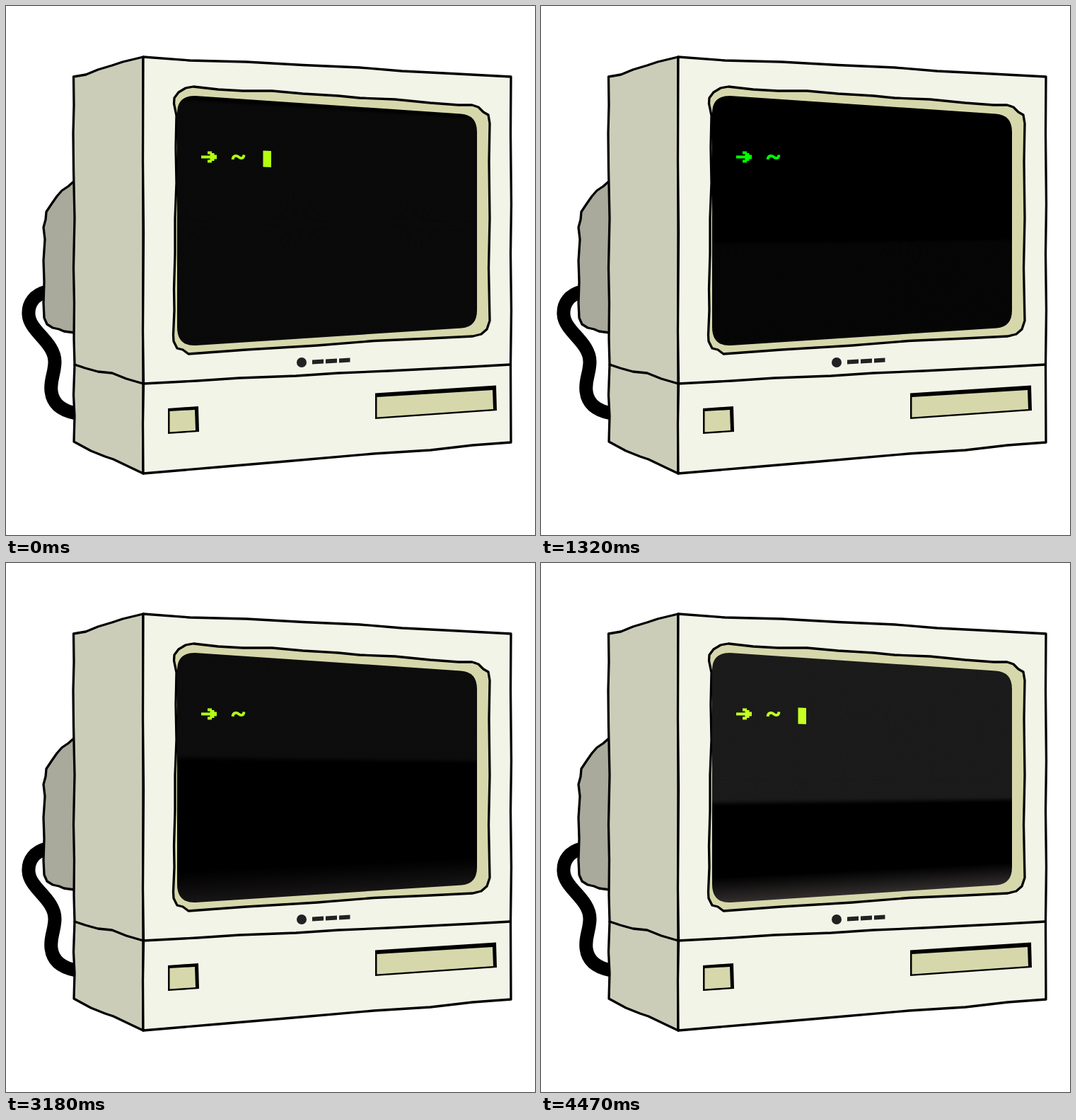
Write an HTML page with a canvas that moves like this. It is 748 px wide and 748 px high and loops after 4.5 s.

```html
<!DOCTYPE html>
<html lang="en">
<head>
<meta charset="utf-8">
<title>Terminal</title>
<style>
html, body { margin: 0; width: 100%; height: 100%; overflow: hidden; background: #fff; }
svg, canvas { position: absolute; left: 0; top: 0; width: 748px; height: 748px; display: block; }
canvas {
  clip-path: path("M242 152 Q242 127 267 127 L643 152.500 Q666 154 666 178 L666 430 Q666 454 644 455.500 L268 480 Q242 481 242 454 Z");
}
.line { fill: none; stroke: #000; stroke-width: 3.3; stroke-linejoin: round; stroke-linecap: round; }
.tan { fill: #d6d8ac; }
</style>
</head>
<body>
<svg viewBox="0 0 748 748">
  <path d="M57 404 C41 408 31 420 32 436 C33 460 69 475 69 503 C69 520 62 528 64 545 C66 562 78 572 99 576" fill="none" stroke="#000" stroke-width="19"/>
  <path class="line" style="fill:#a9aa9b" d="M97 247 L88 255 79 261 72 269 65 279 57 291 56 302 53 313 55 330 53 360 54 390 53 420 54 441 58 450 66 455 75 457 82 460 97 462"/>
  <path class="line" style="fill:#cbcdb9" d="M95.500 100 L113 97 130 90 150 84 165 79 194 72 V661 L175 652 152 641 140 637 120 629 96 616 97 580 95.500 550 97 507 96 470 96.500 420 95.500 370 97 300 95.500 230 95 180 96 140 Z"/>
  <path class="line" style="fill:#f3f4e8" d="M194 72 L260 77 340 79 420 83.500 500 87 560 92 620 95 714 100 713.500 180 714.500 280 713.500 350 714.500 430 713.500 507 714 617 660 621 600 628 520 633 400 643.500 300 652 194 661 193.500 590 194.500 534 193.500 460 194.500 320 193.500 220 Z"/>
  <path class="line" d="M97 507 L112 512 130 517 150 519 170 527 194 534 270 530 330 526 410 523 470 519 540 516 600 513 660 510 713 507"/>
  <path class="line" style="fill:#d6d8ac" d="M238 130 L244 122 254 116 265 114 300 118 335 120 376 120 420 124 470 127 500 130 550 132 600 137 640 140 659 140 668 143 675 150 682 154 684 166 683 220 684 300 682.500 370 684 445 680 457 672 464 660 467 600 470 520 473.500 440 480 340 486 258 492 250 486 242 484 237 474 236.500 465 238 430 237.500 400 239 350 239 300 241 250 240 200 241 155 237.500 138 Z"/>
  <g fill="#222">
    <circle cx="418" cy="504" r="7"/>
    <path d="M433 500.500 L449 499.500 V505.500 L433 506.500 Z M452 499.500 L468 498.500 V504.500 L452 505.500 Z M471 498.500 L486.500 497.500 V503.500 L471 504.500 Z"/>
  </g>
  <path d="M229 569 L272 566 273 602 229 605 Z"/>
  <path class="tan" d="M231.500 573 L267 571 268 600 231.500 602.500 Z"/>
  <path d="M522 547.500 L693 536.500 694 572 522 584 Z"/>
  <path class="tan" d="M524.500 553 L688 543 689 570 524.500 581.500 Z"/>
</svg>
<canvas id="screen" width="748" height="748"></canvas>
<script>
const LOOP = 4500, STEP = 30, ROWS = 350;
const ctx = document.getElementById('screen').getContext('2d');

// Rows of the tilted screen: 0 is the top edge, 1 the bottom edge.
const leftY = u => 126 + 355 * u;
const rightY = u => 154 + 300 * u;
const rowAt = (x, y) => {
  const k = (x - 242) / 424;
  return (y - 126 - 28 * k) / (355 - 55 * k);
};

const clamp = v => Math.min(1, Math.max(0, v));
const smooth = v => (v = clamp(v)) * v * (3 - 2 * v);

// Piecewise linear curve through [time, value] pairs.
function curve(keys, t) {
  let i = 1;
  while (i < keys.length - 1 && t > keys[i][0]) i++;
  const [t0, a] = keys[i - 1], [t1, b] = keys[i];
  return a + (b - a) * clamp((t - t0) / (t1 - t0));
}

const oldLight = [[0, 10], [720, 11], [1320, 6], [2070, 8]];
const newLight = [[3270, 13], [3480, 29], [4470, 27]];
const newEdge = [[2190, -0.03], [2760, 0.225], [3510, 0.573], [4470, 0.6]];
const glowLight = [[3000, 0], [3480, 58]];

function stateAt(t) {
  const head = curve(newEdge, t);
  return {
    tail: 0.014 + t * 0.000436,
    tailLight: curve(oldLight, t),
    head,
    headLight: curve(newLight, t),
    glow: curve(glowLight, t),
    glowTop: Math.max(0.87, head + 0.295),
    cursor: (t + 60) % 900 < 300
  };
}

function lightAt(u, s) {
  const below = s.tailLight * smooth((u - s.tail) / 0.025 + 0.5);
  const above = s.headLight * smooth((s.head - u) / 0.035 + 0.5);
  return Math.max(below, above);
}

function ink(level) {
  const k = clamp(level / 10), extra = clamp((level - 10) / 19);
  return `rgb(${178 * k + 22 * extra},255,${16 * k + 20 * extra})`;
}

function drawScreen(s) {
  for (let i = 0; i < ROWS; i++) {
    const u = i / ROWS;
    const glow = s.glow * clamp((u - s.glowTop) / 0.12);
    const base = lightAt(u, s), cool = base + glow * 0.91;
    ctx.fillStyle = `rgb(${base + glow},${cool},${cool})`;
    ctx.beginPath();
    ctx.moveTo(242, i ? leftY(u) : 120);
    ctx.lineTo(666, i ? rightY(u) : 148);
    ctx.lineTo(666, 490);
    ctx.lineTo(242, 490);
    ctx.fill();
  }
}

const arrow = new Path2D('M276 211.500H288.500V209.500H285V205.500H291V208H294.500V210.500H298V216.500H294.500V219H291V221.500H285V217.500H288.500V215.500H276Z');
const tilde = new Path2D('M320.500 217C321 211 326 211 329 213.500S336 216 336.500 210.500');
const cursor = new Path2D('M363.500 204.500L375 205V228L363.500 227.500Z');

function drawPrompt(s) {
  const paint = ctx.createLinearGradient(0, 203, 0, 229);
  for (let i = 0; i <= 10; i++) {
    paint.addColorStop(i / 10, ink(lightAt(rowAt(330, 203 + 2.6 * i), s)));
  }
  ctx.fillStyle = ctx.strokeStyle = paint;
  ctx.lineWidth = 3.8;
  ctx.fill(arrow);
  ctx.stroke(tilde);
  if (s.cursor) ctx.fill(cursor);
}

const start = performance.now();
function frame() {
  const t = (performance.now() - start) % LOOP;
  const s = stateAt(Math.floor(t / STEP) * STEP);
  drawScreen(s);
  drawPrompt(s);
  requestAnimationFrame(frame);
}
frame();
</script>
</body>
</html>
```
